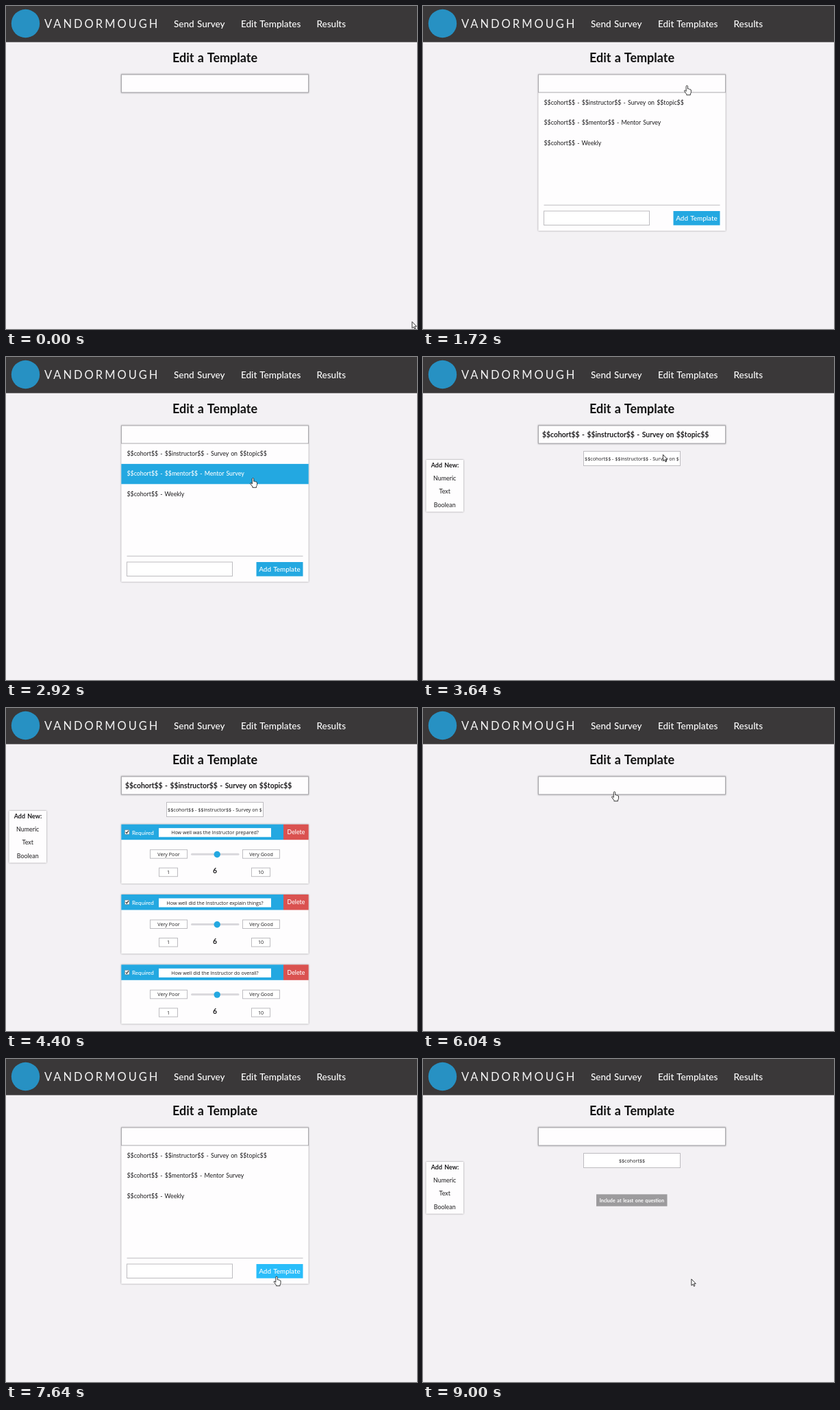
Write an HTML page that moves like this. It is 600 by 471 pixels and loops after 9.04 s.

```html
<!DOCTYPE html>
<html lang="en">
<head>
<meta charset="utf-8">
<title>Edit a Template</title>
<style>
  html, body { margin: 0; width: 100%; height: 100%; overflow: hidden; background: #f3f1f4; }
  svg { display: block; width: 600px; height: 471px; font-family: Lato, "Open Sans", sans-serif; word-spacing: .06em; }
  .input { font-family: "Open Sans", "Noto Sans", sans-serif; word-spacing: 0; }
  .soft { filter: drop-shadow(.4px .7px 1px rgba(0, 0, 0, .42)); }
</style>
</head>
<body>
<svg id="stage" viewBox="0 0 600 471" xmlns="http://www.w3.org/2000/svg"></svg>
<script>
const LOOP = 9040, STEP = 40;
const BLUE = '#23a8e1', BRIGHT = '#29bdfa', RED = '#da5250', INK = '#1c1b1d', LINE = '#bdbcc0';
const NS = 'http://www.w3.org/2000/svg';
const stage = document.getElementById('stage');

function add(parent, tag, attrs = {}, content) {
  const el = document.createElementNS(NS, tag);
  for (const key in attrs) el.setAttribute(key, attrs[key]);
  if (content !== undefined) el.textContent = content;
  parent.appendChild(el);
  return el;
}
const group = (parent = stage, attrs) => add(parent, 'g', attrs);
const box = (parent, x, y, width, height, fill, more) =>
  add(parent, 'rect', { x, y, width, height, fill, ...more });
const label = (parent, x, y, size, content, more) =>
  add(parent, 'text', { x, y, 'font-size': size, fill: INK, ...more }, content);
const show = (el, on) => { el.style.display = on ? '' : 'none'; };
const centered = { 'text-anchor': 'middle' };

function field(parent, x, y, w, h, value = '', stroke = LINE) {
  box(parent, x + .5, y + .5, w - 1, h - 1, '#fff', { stroke });
  return label(parent, x + w / 2, y + h / 2 + 2.6, 7.15, value, { ...centered, class: 'input' });
}

// Header and heading
box(stage, 0, 0, 600, 471, '#f3f1f4');
box(stage, 0, 0, 600, 52.7, '#3a3839');
add(stage, 'circle', { cx: 28.5, cy: 25.5, r: 20.7, fill: '#2791c3' });
label(stage, 56, 32.3, 16.5, 'VANDORMOUGH', { fill: '#f4f4f4', 'letter-spacing': 3 });
[[245, 'Send Survey'], [343, 'Edit Templates'], [453.5, 'Results']].forEach(([x, name]) =>
  label(stage, x, 30.5, 13.5, name, { fill: '#fff', 'font-weight': 500 }));
label(stage, 305, 82, 18, 'Edit a Template', { ...centered, fill: '#111', 'font-weight': 700 });

// Template picker
const names = [
  '$$cohort$$ - $$instructor$$ - Survey on $$topic$$',
  '$$cohort$$ - $$mentor$$ - Mentor Survey',
  '$$cohort$$ - Weekly'
];
const ROW = 29.4, ROW_TOP = 126.5;
const menu = group();
box(menu, 168.3, 99.8, 273.4, 228, '#fefdfe', { class: 'soft' });
const rows = names.map((name, i) => ({
  back: box(menu, 168.3, ROW_TOP + i * ROW, 273.4, ROW, BLUE),
  text: label(menu, 176.5, ROW_TOP + i * ROW + 17.3, 8.75, name)
}));
box(menu, 176.5, 289.8, 257, 1, '#bfbec1');
field(menu, 176, 298.5, 155, 21.5);
const button = box(menu, 365.5, 299, 68, 20.7, BLUE);
label(menu, 399.5, 312.8, 9.9, 'Add Template', { ...centered, fill: '#fff', 'font-weight': 500 });

const picker = group();
const frame = box(picker, 168.5, 100, 273, 26, '#fefdfe', { stroke: '#a9a8ac' });
const chosen = label(picker, 174, 116.8, 10.4, names[0], { 'font-weight': 700 });

// Side panel and name field
const editor = group();
box(editor, 4.5, 150, 54.5, 75.7, '#fefdfe', { class: 'soft' });
label(editor, 32, 161.3, 9, 'Add New:', { ...centered, 'font-weight': 700 });
['Numeric', 'Text', 'Boolean'].forEach((name, i) =>
  label(editor, 31.7, 179.8 + i * 19.6, 8.9, name, centered));
const title = field(editor, 234, 137, 142, 22);

// Question cards
const cards = group();
function card(y, question) {
  const g = group(cards, { transform: `translate(0 ${y})` });
  box(g, 168.3, 0, 273.4, 86.3, '#fefdfe', { class: 'soft' });
  box(g, 168.3, 0, 236.7, 22.5, BLUE);
  box(g, 405, 0, 36.7, 22.5, RED);
  label(g, 423.5, 14.3, 8.8, 'Delete', { ...centered, fill: '#fff', 'font-weight': 500 });
  box(g, 173.5, 8, 6.5, 6.5, '#fff', { stroke: '#777', 'stroke-width': .6, rx: .8 });
  add(g, 'path', { d: 'M174.8 11.2l1.5 1.7 2.6-3.8', fill: 'none', stroke: '#222', 'stroke-width': 1.1 });
  label(g, 184, 15, 8.1, 'Required', { fill: '#fff', 'font-weight': 500 });
  field(g, 223, 5.5, 164, 13, question, '#fff');
  field(g, 210, 36.5, 55, 13.5, 'Very Poor');
  field(g, 345, 36.5, 55, 13.5, 'Very Good');
  box(g, 270, 42, 70.5, 3, '#d9d8dc', { rx: 1.5 });
  add(g, 'circle', { cx: 308.2, cy: 43.8, r: 4.7, fill: BLUE });
  field(g, 223, 63, 28, 13.5, '1');
  field(g, 358, 63, 28, 13.5, '10');
  label(g, 305, 71.8, 10.4, '6', { ...centered, 'font-weight': 700 });
}
['How well was the Instructor prepared?', 'How well did the Instructor explain things?',
  'How well did the Instructor do overall?'].forEach((q, i) => card(169.7 + i * 102.3, q));

const warning = group();
box(warning, 253, 197.3, 103.5, 17.4, '#9c9b9d');
label(warning, 304.8, 208.6, 7.1, 'Include at least one question',
  { ...centered, fill: '#fff', 'font-weight': 700 });

// Pointers, both with the tip at 0,0
const ink = { fill: '#fff', stroke: '#222', 'stroke-width': .9, 'stroke-linejoin': 'round' };
const arrow = add(stage, 'path', { ...ink, d: 'M.4.4V9.8L2.5 7.8 4 11 5.4 10.4 4 7.2H6.8Z' });
const hand = add(stage, 'path', { ...ink,
  d: 'M-1.2 8V.8Q-1.1-.4 0-.4T1.2.8V4.4Q2.3 3.7 3 4.8 4.2 4.2 4.6 5.3 5.9 5 6 6.4V9.2Q6 10.5 5 11.6V13.3H-.6V12L-3.7 8Q-4.3 6.6-3 6.5Z' });

// Screen at each time
const scenes = [
  [0, 'empty'], [900, 'menu'], [3440, 'loading'], [3760, 'survey'],
  [5080, 'empty'], [6560, 'menu'], [7960, 'new']
];
// Pointer path: time, x, y
const path = [
  [0, 592.5, 460], [80, 592.5, 460], [840, 386, 116], [1880, 385.3, 116.5],
  [2300, 372, 140], [2720, 360.5, 177], [3000, 360.5, 177], [3280, 350, 142],
  [3720, 350, 142], [4280, 360, 480], [5079, 360, 480], [5080, 354, 281],
  [5600, 354, 281], [6000, 279.5, 122.5], [6640, 280, 122], [7360, 395, 317.5],
  [8360, 395, 317.5], [8760, 391.5, 320.5], [LOOP, 391.5, 320.5]
];

function pointerAt(t) {
  const i = path.findIndex(p => p[0] > t);
  const [t0, x0, y0] = path[i - 1], [t1, x1, y1] = path[i];
  const u = (t - t0) / (t1 - t0), k = u * u * (3 - 2 * u);
  return [x0 + (x1 - x0) * k, y0 + (y1 - y0) * k];
}
const inside = (x, y, l, t, r, b) => x >= l && x < r && y >= t && y < b;

function draw(t) {
  const scene = scenes.filter(s => s[0] <= t).pop()[1];
  const [x, y] = pointerAt(t);
  const open = scene === 'menu', survey = scene === 'survey' || scene === 'loading';
  const editing = survey || scene === 'new';

  show(menu, open);
  show(editor, editing);
  show(cards, scene === 'survey');
  show(warning, scene === 'new');
  show(chosen, survey);
  frame.setAttribute('class', open ? '' : 'soft');
  title.textContent = survey ? '$$cohort$$ - $$instructor$$ - Survey on $' : '$$cohort$$';

  let overRow = false;
  rows.forEach((row, i) => {
    const top = ROW_TOP + i * ROW;
    const over = open && inside(x, y, 168, top, 442, top + ROW);
    overRow = overRow || over;
    show(row.back, over);
    row.text.setAttribute('fill', over ? '#fff' : INK);
    row.text.setAttribute('font-weight', over ? 500 : 400);
  });
  const overButton = open && inside(x, y, 365, 299, 434, 320);
  button.setAttribute('fill', overButton ? BRIGHT : BLUE);

  const pointing = overRow || overButton || inside(x, y, 168, 100, 442, 126.5);
  show(hand, pointing);
  show(arrow, !pointing);
  (pointing ? hand : arrow).setAttribute('transform', `translate(${x} ${y})`);
}

const start = performance.now();
function tick() {
  const t = (performance.now() - start) % LOOP;
  draw(Math.floor(t / STEP) * STEP);
  requestAnimationFrame(tick);
}
tick();
</script>
</body>
</html>
```
